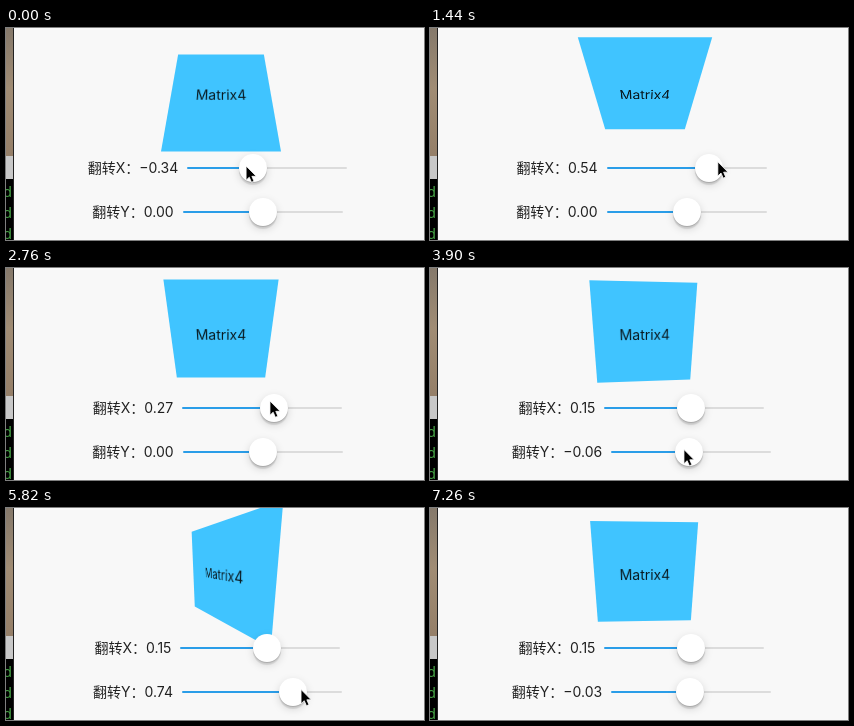
An HTML page for the animation above (7.68 s loop, 418 by 212 pixels).

```html
<!DOCTYPE html>
<html lang="zh-CN">
<meta charset="utf-8">
<title>Matrix4</title>
<style>
  html, body { margin: 0; width: 100%; height: 100%; overflow: hidden; }
  body { position: relative; background: #f8f8f8; color: #000000de; font: 14px/20px Inter, "Noto Sans CJK SC", sans-serif; }
  #edge { position: absolute; left: 0; top: 0; width: 7px; height: 212px; overflow: hidden; border-right: 1px solid #222;
    background: linear-gradient(#85796b, #a08c74 60px, #957f68 128px, #c8c8c8 128px 151px, #000 151px); }
  #edge i { position: absolute; left: -3px; top: 153px; width: 9px; word-break: break-all;
    font: 15px/21px "Noto Sans Mono", monospace; color: #45a045; }
  #box { position: absolute; left: 165px; top: 17.4px; width: 100px; height: 100px; background: #40c4ff;
    line-height: 100px; text-align: center; }
  .row { position: absolute; left: 8.5px; width: 414px; height: 44px; display: flex; justify-content: center; align-items: center; white-space: nowrap; }
  .track { position: relative; width: 160px; height: 2px; margin: 0 8px 0 9px; border-radius: 1px; }
  .thumb { position: absolute; top: -13px; width: 28px; height: 28px; border-radius: 50%; background: #fff;
    box-shadow: 0 3px 8px #00000026, 0 1px 1px #00000029, 0 3px 1px #0000001a; }
  #cursor { position: absolute; left: 0; top: 0; overflow: visible; }
</style>
<div id="edge"><i>ddd</i></div>
<div id="box">Matrix4</div>
<div class="row" style="top:118px"><span></span><div class="track"><div class="thumb"></div></div></div>
<div class="row" style="top:162px"><span></span><div class="track"><div class="thumb"></div></div></div>
<svg id="cursor" width="12" height="18"><path d="M0 0V14.2L3.2 11.2 5.4 16.3 7.9 15.2 5.8 10.3H10.2Z" stroke="#fff" stroke-width=".8"/></svg>
<script>
const LOOP = 7680, STEP = 60, LAG = 90;
const PX_PER_RAD = 132 / Math.PI;

// Sine ease from 0 to 1 between two times
function ease(t, start, end) {
  const u = Math.min(1, Math.max(0, (t - start) / (end - start)));
  return (1 - Math.cos(Math.PI * u)) / 2;
}

// Each drag swings smoothly between its turning points
const angleX = t => -.34 - .72 * ease(t, 0, 540) + 2.44 * ease(t, 540, 2040) - 1.23 * ease(t, 2040, 2940);
const angleY = t => -.733 * ease(t, 3740, 4620) + 1.747 * ease(t, 4620, 6240) - 1.044 * ease(t, 6240, 6960);

// The pointer runs slightly ahead of the thumb, changes slider once, then leaves
function pointer(t) {
  const drag = (angleX(t + LAG) + angleY(t + LAG)) * PX_PER_RAD;
  const change = ease(t, 3000, 3500), leave = ease(t, 7080, 7260);
  return [256.4 + drag - 3 * change + 72 * leave, 138 - 5 * ease(t, 0, 1980) + 48.5 * change + 32 * leave];
}

const box = document.getElementById("box");
const cursor = document.getElementById("cursor");
const rows = document.querySelectorAll(".row");

function drawRow(row, axis, angle) {
  const [label, track] = row.children;
  const x = 80 + angle * PX_PER_RAD;
  label.textContent = `翻转${axis}：` + angle.toFixed(2).replace("-", "−");
  track.style.background = `linear-gradient(90deg, #2a9de8 ${x}px, #dcdcdc ${x}px)`;
  track.firstChild.style.left = x - 14 + "px";
}

function draw(now) {
  const t = Math.floor(now % LOOP / STEP) * STEP;
  const x = angleX(t), y = angleY(t), [px, py] = pointer(t);
  box.style.transform = `matrix3d(1,0,0,0, 0,1,0,0, 0,0,1,.01, 0,0,0,1) rotateX(${x}rad) rotateY(${y}rad)`;
  drawRow(rows[0], "X", x);
  drawRow(rows[1], "Y", y);
  cursor.style.transform = `translate(${px}px, ${py}px)`;
  requestAnimationFrame(draw);
}
draw(0);
</script>
</html>
```
